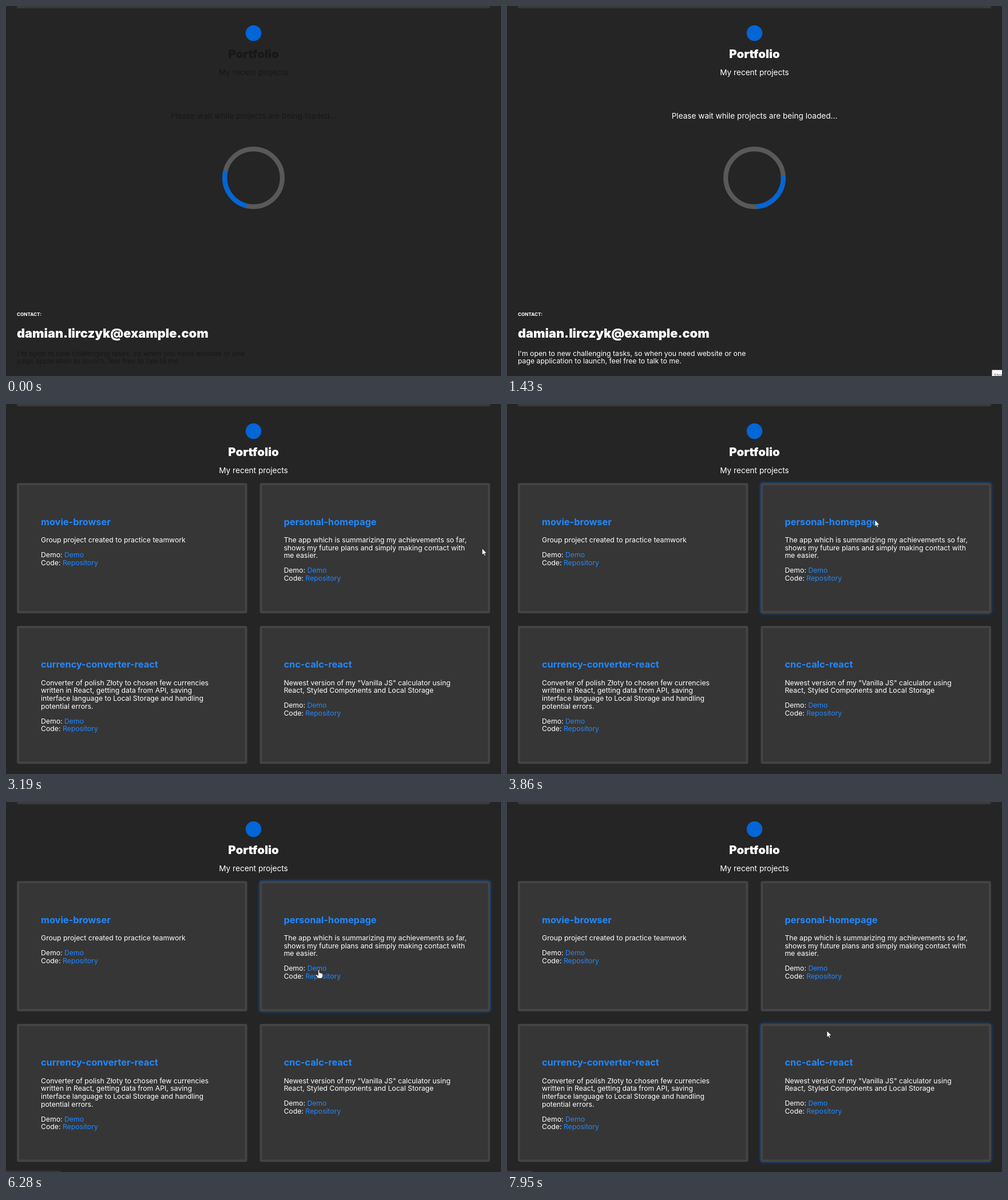
Write an HTML page that moves like this. It is 865x647 px and loops after 8 s.

```html
<!DOCTYPE html>
<html lang="en">
<head>
<meta charset="utf-8">
<title>Portfolio</title>
<style>
  html, body { margin: 0; width: 100%; height: 100%; overflow: hidden; background: #252525; }
  svg { display: block; width: 865px; height: 647px; font-family: Inter, sans-serif; }
  text { white-space: pre; fill: #fff; }
  .mid { text-anchor: middle; }
  .fade { fill: inherit; }
  .head { font-size: 20.4px; font-weight: 900; }
  .lead { font-size: 13.6px; }
  .body { font-size: 12.24px; }
  .title { font-size: 16.32px; font-weight: 700; }
  .title, .link { fill: #2188ff; }
  .label { font-size: 8.16px; font-weight: 700; }
  .mail { font-size: 21.76px; font-weight: 900; }
  .glow { fill: #0366d6; filter: blur(2px); }
  .hint { font-size: 8px; fill: #555; }
</style>
</head>
<body>
<svg viewBox="0 0 865 647">
  <path d="M19 0H846V1.5Q846 4 843.500 4H21.500Q19 4 19 1.500Z" fill="#3a3a3a"/>
  <circle cx="432.500" cy="47.500" r="13.700" fill="#0366d6"/>
  <g id="intro"></g>
  <g id="loading">
    <g id="loadingText"></g>
    <g fill="none" stroke-width="8.160">
      <circle cx="432.500" cy="300.500" r="50.300" stroke="#595959"/>
      <path id="arc" d="M482.800 300.500A50.300 50.300 0 0 1 432.500 350.800" stroke="#0366d6"/>
    </g>
  </g>
  <g id="cards"></g>
  <path id="status" fill="#343434"/>
  <g id="hint">
    <rect x="847.500" y="636.500" width="30" height="20" fill="#fff"/>
    <text class="hint" x="851" y="649">Stop</text>
  </g>
  <g id="cursor">
    <path id="arrow" d="M0 0V11.500L2.600 9.200 4.300 13 6.200 12.200 4.500 8.500H8.200Z" fill="#fff" stroke="#111" stroke-width=".7"/>
    <path id="beam" d="M-2.500 -6H-.8L0 -5.400 .8 -6H2.500M0 -5.400V5.400M-2.500 6H-.8L0 5.400 .8 6H2.500" fill="none" stroke="#ddd" stroke-width=".9"/>
    <path id="hand" d="M-1.200 1Q0 -.8 1.200 1V5.200Q2.500 4.400 3.400 5.700 4.800 5.100 5.400 6.400 7 6 7 7.800V11L5.600 14.800H-1.600L-5 9.800Q-4.900 7.700 -2.800 8.600L-1.200 10Z" fill="#fff" stroke="#111" stroke-width=".7"/>
  </g>
</svg>
<script>
const $ = id => document.getElementById(id);
const text = (cls, x, y, s) => `<text class="${cls}" x="${x}" y="${y}">${s}</text>`;
const LINE = 13.6, STEP = 67.5, LOOP = 8000;

$('intro').innerHTML =
  text('mid fade head', 432.5, 91.3, 'Portfolio') +
  text('mid fade lead', 432.5, 121.2, 'My recent projects');
$('loadingText').innerHTML =
  text('mid fade lead', 432.5, 196.5, 'Please wait while projects are being loaded...') +
  text('label', 19, 542.2, 'CONTACT:') +
  text('mail', 19, 580, 'damian.lirczyk@example.com') +
  text('fade body', 19, 611.7, "I'm open to new challenging tasks, so when you need website or one") +
  text('fade body', 19, 625.4, 'page application to launch, feel free to talk to me.');

const projects = [
  ['movie-browser', 'Group project created to practice teamwork'],
  ['personal-homepage', 'The app which is summarizing my achievements so far,',
    'shows my future plans and simply making contact with', 'me easier.'],
  ['currency-converter-react', 'Converter of polish Złoty to chosen few currencies',
    'written in React, getting data from API, saving',
    'interface language to Local Storage and handling', 'potential errors.'],
  ['cnc-calc-react', 'Newest version of my "Vanilla JS" calculator using',
    'React, Styled Components and Local Storage']
];

function card([title, ...lines], i) {
  const x = 19 + i % 2 * 424.4, y = 138.2 + (i >> 1) * 249.7, h = i < 2 ? 227.7 : 241.3;
  const first = y + 103.8, demo = first + (lines.length - 1) * LINE + 26;
  const link = (label, name, ly) =>
    text('body', x + 42, ly, `${label}: <tspan class="link">${name}</tspan>`);
  return `<rect class="glow" id="glow${i}" x="${x - .5}" y="${y - .5}" width="403.500" height="${h + 1}" rx="4"/>
    <rect x="${x}" y="${y}" width="402.500" height="${h}" rx="3" fill="#444"/>
    <rect x="${x + 4}" y="${y + 4}" width="394.500" height="${h - 8}" fill="#363636"/>` +
    text('title', x + 42, y + 73.4, title) +
    lines.map((s, n) => text('body', x + 42, first + n * LINE, s)).join('') +
    link('Demo', 'Demo', demo) + link('Code', 'Repository', demo + LINE);
}
$('cards').innerHTML = projects.map(card).join('');

const ramp = (t, from, span) => Math.min(1, Math.max(0, (t - from) / span));
const smooth = u => u * u * (3 - 2 * u);
const show = (id, on) => $(id).style.display = on ? '' : 'none';

// Pointer moves: start, end, target x, target y
const moves = [
  [3190, 3990, 628, 199],
  [4060, 4790, 576.5, 253],
  [4790, 4860, 570, 259],
  [4930, 5600, 546.5, 293.5],
  [7280, 7700, 559, 400]
];

function pointer(t) {
  let x = 832, y = 252.5;
  for (const [a, b, tx, ty] of moves) {
    const u = smooth(ramp(t, a, b - a));
    x += (tx - x) * u;
    y += (ty - y) * u;
  }
  return [x, y];
}

function statusWidth(t) {
  if (t < 5790) return 0;
  return t < 7420 ? 96 + 100 * smooth(ramp(t, 6280, 400)) : 45;
}

function draw(t) {
  const step = Math.floor(t / STEP + .05), held = step * STEP;
  const loading = t < 1500;
  const shade = Math.round(24 + 231 * smooth(ramp(held, 0, 1000)));
  const ink = `rgb(${shade},${shade},${shade})`;
  $('intro').style.fill = $('loadingText').style.fill = ink;
  show('loading', loading);
  show('cards', !loading);
  $('arc').setAttribute('transform', `rotate(${104 + step * 12} 432.5 300.5)`);

  $('hint').style.opacity = t < 550 || t >= 2230 ? 0 : t < 2170 ? 1 : .5;

  const glow = [0, ramp(held, 3190, 250) - ramp(held, 7540, 250), 0, ramp(held, 7612, 250)];
  glow.forEach((g, i) => $('glow' + i).style.opacity = g * .75);

  const w = statusWidth(held + 10);
  $('status').setAttribute('d', w ? `M0 644.500H${w - 2}Q${w} 644.500 ${w} 647H0Z` : '');

  const [x, y] = pointer(held + 10);
  const inside = (l, top, r, b) => x > l && x < r && y > top && y < b;
  const kind = inside(523, 285, 585, 312) ? 'hand' : inside(486, 232, 803, 258) ? 'beam' : 'arrow';
  show('cursor', t >= 3190);
  for (const k of ['arrow', 'beam', 'hand']) show(k, k === kind);
  $('cursor').setAttribute('transform', `translate(${x} ${y})`);
}

const start = performance.now();
function tick() {
  draw((performance.now() - start) % LOOP);
  requestAnimationFrame(tick);
}
tick();
</script>
</body>
</html>
```
